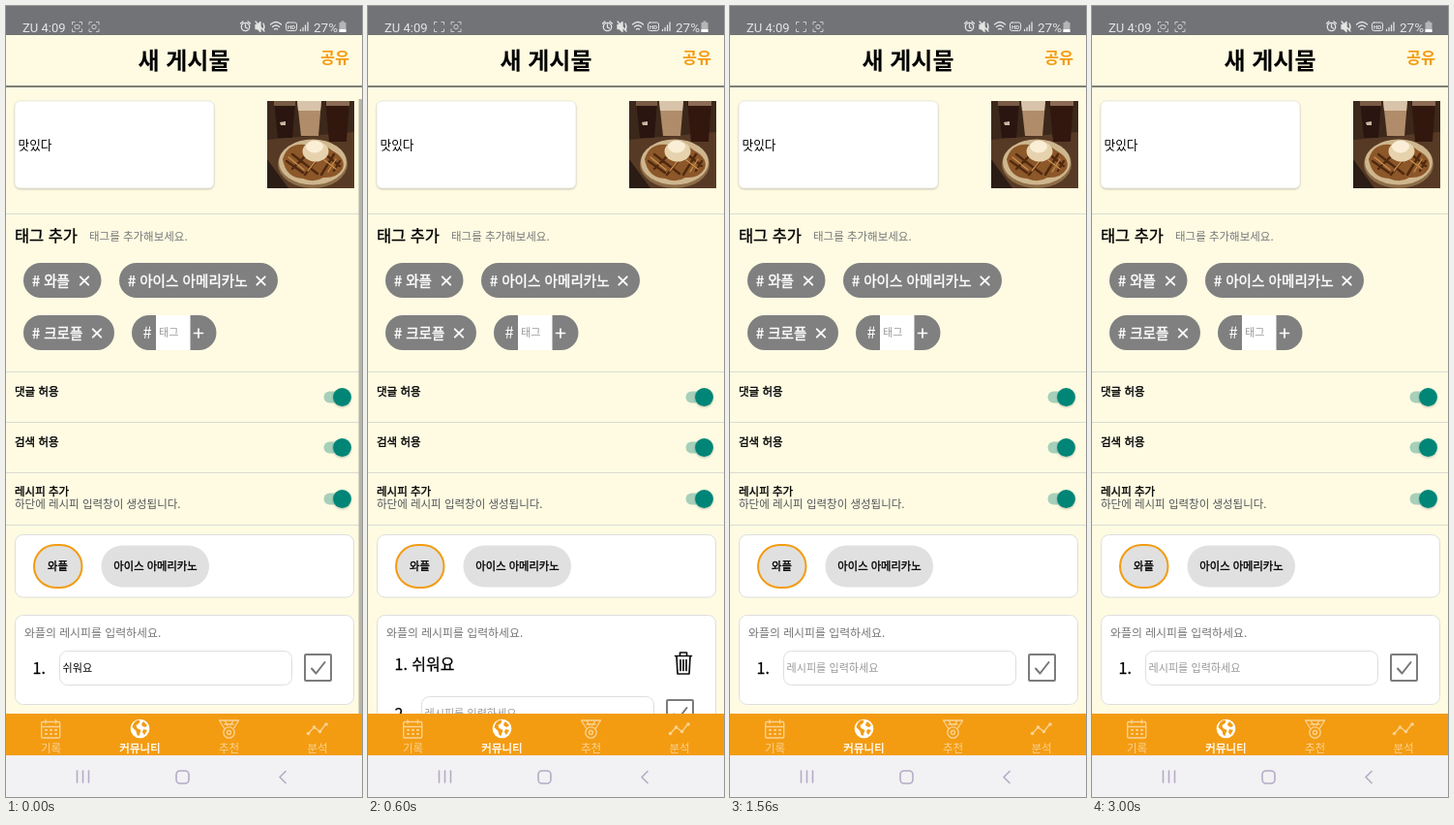
These frames come from a looping animation (368 by 816 pixels, 3120 ms). An HTML page:

```html
<!DOCTYPE html>
<html lang="ko">
<head>
<meta charset="utf-8">
<title>새 게시물</title>
<style>
  html, body { margin: 0; width: 100%; height: 100%; overflow: hidden; background: #fefbe2; }
  svg { display: block; }
  #stage { width: 368px; height: 816px; }
  text { font-family: "Noto Sans CJK KR", "Noto Sans CJK", sans-serif; font-size: 11.5px; fill: #000; }
  .status text { font-family: Roboto, sans-serif; font-size: 13px; fill: #e4e4e4; }
  .medium { stroke: #000; stroke-width: .35; }
  .tag { font-size: 14.6px; fill: #fff; stroke: #fff; stroke-width: .4; }
  .hint { fill: #777; }
  .note { font-weight: 300; fill: #555; }
  .step { font-size: 16px; stroke: #000; stroke-width: .25; }
  .field { font-size: 11.1px; }
  .faint { fill: #999; }
  .middle text, text.middle { text-anchor: middle; }
  .line { fill: none; stroke-linecap: round; stroke-linejoin: round; }
  .card { fill: #fff; stroke: #dedede; }
  .tabs { opacity: .55; }
  .tabs text, .active text { fill: #fff; }
  .active text { stroke: #fff; stroke-width: .35; }

  .dot, .typed, .added, .cleared { animation: 3120ms step-end infinite; }
  .dot { animation-name: blink; }
  .typed { animation-name: typed; }
  .added { animation-name: added; }
  .cleared { animation-name: cleared; }
  .scrollbar { animation: fade 3120ms linear infinite; }
  @keyframes blink {
    0%, 26.923%, 57.692%, 84.615% { opacity: 1; }
    11.538%, 42.308%, 73.077% { opacity: 0; }
  }
  @keyframes typed { 0% { opacity: 1; } 19.231%, 100% { opacity: 0; } }
  @keyframes added { 0%, 50%, 100% { opacity: 0; } 19.231% { opacity: 1; } }
  @keyframes cleared { 0% { opacity: 0; } 50%, 100% { opacity: 1; } }
  @keyframes fade { 0%, 7.692% { opacity: 1; } 19.231%, 100% { opacity: 0; } }
</style>
</head>
<body>
<svg id="stage" viewBox="0 0 368 816">
  <defs>
    <filter id="shadow" x="-20%" y="-20%" width="140%" height="150%">
      <feDropShadow dx="0" dy="1" stdDeviation="1" flood-opacity=".25"/>
    </filter>
    <clipPath id="page"><rect y="84" width="368" height="646"/></clipPath>
    <clipPath id="photo"><rect x="270" y="98" width="90" height="90"/></clipPath>
    <path id="cross" class="line" d="M-4.200-4.200l8.400 8.400m0-8.400l-8.400 8.400" stroke="#fff" stroke-width="1.900"/>
    <path id="corners" class="line" d="M-5-2.500V-5H-2.500M2.500-5H5V-2.500M5 2.500V5H2.500M-2.500 5H-5V2.500" stroke="#ccc" stroke-width="1"/>
    <g id="switch">
      <rect x="-19" y="-6" width="28" height="12" rx="6" fill="#a6d0ba"/>
      <circle r="9.400" fill="#008577" filter="url(#shadow)"/>
    </g>
    <g id="entry">
      <rect class="card" x="55.500" y="665.500" width="240" height="35" rx="8"/>
      <rect x="309" y="669" width="27" height="27" rx="1" fill="#fff" stroke="#7c7c7c" stroke-width="2"/>
      <path class="line" d="M316 683.500l4.500 5 9-11.500" stroke="#777" stroke-width="2"/>
    </g>
  </defs>

  <rect width="368" height="816" fill="#fefbe2"/>

  <g class="status">
    <rect width="368" height="30" fill="#727377"/>
    <text x="17" y="26.500">ZU 4:09</text>
    <use href="#corners" x="73.500" y="21.500"/>
    <rect class="dot" x="71" y="19.500" width="5" height="4" rx="1.500" fill="none" stroke="#ccc"/>
    <use href="#corners" x="91" y="21.500"/>
    <circle cx="91" cy="21.500" r="2.200" fill="none" stroke="#ccc"/>
    <g class="line" stroke="#e4e4e4" stroke-width="1.300">
      <circle cx="247.500" cy="21.500" r="4.200"/>
      <path d="M247.500 19v3l2 1M242.500 18l2.500-2M250 16l2.500 2"/>
      <path d="M258 19.500h2l3-3v10l-3-3h-2zM258 16l9 10M266 18q2 3.500 0 7" fill="#e4e4e4"/>
      <path d="M273.500 19q5.500-5 11 0M275.500 21.500q3.500-3 7 0M277.500 24q1.500-1.300 3 0"/>
      <rect x="289.500" y="17" width="11" height="8.500" rx="2" stroke-width="1"/>
      <path d="M304.500 25.500v-1M307 25.500v-3M309.500 25.500v-5.500M312 25.500v-8.500"/>
    </g>
    <text x="295" y="23.500" class="middle" style="font-size:6px;font-weight:700">HD</text>
    <text x="318" y="26.500" style="font-size:13.500px">27%</text>
    <path d="M346.500 15.500h3v1.500h2v10h-7V17h2z" fill="#b5b5b7"/>
    <path d="M344.500 24h7v3h-7z" fill="#fff"/>
  </g>

  <text x="184" y="64.500" class="middle" style="font-size:24px;font-weight:700">새 게시물</text>
  <text x="325" y="59" style="font-size:16.400px;font-weight:700;fill:#f39c12">공유</text>
  <rect y="82" width="368" height="2" fill="#7f7e75"/>

  <g clip-path="url(#page)">
    <rect x="9" y="98" width="206" height="90" rx="6" fill="#fff" filter="url(#shadow)"/>
    <rect x="9" y="98" width="206" height="90" rx="6" fill="#fff" stroke="#e4e2d8" stroke-width=".700"/>
    <text x="12.500" y="147.500" style="font-size:12.700px">맛있다</text>

    <g clip-path="url(#photo)">
      <rect x="270" y="98" width="90" height="90" fill="#3c281b"/>
      <path d="M270 138l90-8v58h-90z" fill="#573a25"/>
      <path d="M270 158l22 30h-22z" fill="#2b1d15"/>
      <path d="M277 98h22l-3 38h-15z" fill="#2a1510"/>
      <path d="M277 98h22v5h-22z" fill="#795b45"/>
      <path d="M301 98h25l-3 36h-18z" fill="#b08c6a"/>
      <path d="M301 98h25l-1 10h-23z" fill="#d8c4aa"/>
      <path d="M330 98h25l-3 42h-18z" fill="#32170f"/>
      <path d="M331 98h24v5h-24z" fill="#8b6b55"/>
      <path d="M283 120l6-1v4h-5z" fill="#c9b8a2"/>
      <ellipse cx="317" cy="163" rx="36" ry="25" fill="#8d6d48"/>
      <ellipse cx="317" cy="161" rx="35" ry="23.500" fill="#ceb68e"/>
      <path d="M286 158q5-17 23-15 18-3 28 6 15 8 11 19-6 10-20 9-9 6-21 1-18-1-21-20z" fill="#8c5729"/>
      <path class="line" d="M290 160l17 12M296 153l26 20M330 153l15 12M296 168l12-12M309 174l13-16M326 174l13-21M339 170l6-10" stroke="#50290f" stroke-width="2.400"/>
      <path class="line" d="M292 156l16 13M329 159l12 9M312 170l8-10M333 171l8-13" stroke="#c8904f" stroke-width="1.300"/>
      <ellipse cx="320" cy="150" rx="13.500" ry="10.500" fill="#e6d3ae"/>
      <ellipse cx="319" cy="145" rx="9" ry="6.500" fill="#faeed6"/>
    </g>

    <g fill="#dcdbd2">
      <rect y="214" width="368" height="1"/>
      <rect y="377" width="368" height="1"/>
      <rect y="429" width="368" height="1"/>
      <rect y="481" width="368" height="1"/>
      <rect y="535" width="368" height="1"/>
    </g>

    <text x="9" y="243" class="medium" style="font-size:16.400px">태그 추가</text>
    <text x="86" y="241.500" class="hint">태그를 추가해보세요.</text>

    <g fill="#808080">
      <rect x="18" y="265" width="80.500" height="36" rx="18"/>
      <rect x="117" y="265" width="164" height="36" rx="18"/>
      <rect x="18" y="319" width="94" height="36" rx="18"/>
      <rect x="130" y="319" width="87.500" height="36" rx="18"/>
    </g>
    <text x="27" y="288.500" class="tag"># 와플</text>
    <text x="126" y="288.500" class="tag"># 아이스 아메리카노</text>
    <text x="27" y="342.500" class="tag"># 크로플</text>
    <text x="141.500" y="343" class="tag" style="font-size:16.500px;stroke:none">#</text>
    <use href="#cross" x="81" y="283.500"/>
    <use href="#cross" x="263.500" y="283.500"/>
    <use href="#cross" x="94" y="337.500"/>
    <rect x="155" y="319" width="35.500" height="36" fill="#fff"/>
    <text x="158" y="341" class="field faint">태그</text>
    <path class="line" d="M194.500 337.500h9m-4.500-4.500v9" stroke="#fff" stroke-width="1.700"/>

    <text x="9" y="402" class="medium">댓글 허용</text>
    <text x="9" y="454" class="medium">검색 허용</text>
    <text x="9" y="505" class="medium">레시피 추가</text>
    <text x="9" y="518" class="note">하단에 레시피 입력창이 생성됩니다.</text>
    <use href="#switch" x="347.500" y="403.500"/>
    <use href="#switch" x="347.500" y="455.500"/>
    <use href="#switch" x="347.500" y="508.500"/>

    <rect class="card" x="9.500" y="545.500" width="350" height="64.500" rx="8"/>
    <rect x="29" y="556" width="49.500" height="44" rx="22" fill="#e0e0e0" stroke="#f39c12" stroke-width="2"/>
    <rect x="98.500" y="556.500" width="111.500" height="43" rx="21.500" fill="#e0e0e0"/>
    <g class="middle">
      <text x="53.500" y="582" class="medium" style="font-size:11.300px">와플</text>
      <text x="154.500" y="582" class="medium" style="font-size:11.300px">아이스 아메리카노</text>
    </g>

    <rect class="card added" x="9.500" y="628.500" width="350" height="139" rx="8"/>
    <rect class="card typed" x="9.500" y="628.500" width="350" height="92" rx="8"/>
    <rect class="card cleared" x="9.500" y="628.500" width="350" height="92" rx="8"/>
    <text x="19" y="651" class="hint" style="font-size:11.900px">와플의 레시피를 입력하세요.</text>

    <g class="typed">
      <use href="#entry"/>
      <text x="27.500" y="689" class="step">1.</text>
      <text x="58.500" y="687" class="field">쉬워요</text>
    </g>
    <g class="added">
      <text x="27.500" y="684.500" class="step">1. 쉬워요</text>
      <path class="line" d="M317.500 670.500h17M322.500 670v-3h7v3M319 671l1 18h12l1-18M323 674.500v11M326 674.500v11M329 674.500v11" stroke="#111" stroke-width="1.700"/>
      <use href="#entry" y="47"/>
      <text x="27.500" y="736" class="step">2.</text>
      <text x="58.500" y="734" class="field faint">레시피를 입력하세요</text>
    </g>
    <g class="cleared">
      <use href="#entry"/>
      <text x="27.500" y="689" class="step">1.</text>
      <text x="58.500" y="687" class="field faint">레시피를 입력하세요</text>
    </g>

    <rect class="scrollbar" x="364.500" y="96" width="3.500" height="634" fill="#b8b6a8"/>
  </g>

  <rect y="730" width="368" height="43" fill="#f39c12"/>
  <g class="tabs middle">
    <g class="line" stroke="#fff" stroke-width="1.300">
      <rect x="36.700" y="738.500" width="19" height="16.500" rx="1"/>
      <path d="M36.700 743.500h19M41 736.500v3.500M51.500 736.500v3.500"/>
      <path d="M41 747h11M41 751h11" stroke-width="2" stroke-dasharray="1 4"/>
      <path d="M220.500 737h20l-5 8M220.500 737l5 8M226 737l3 5M235 737l-3 5M226 741h9"/>
      <circle cx="230.500" cy="749.500" r="5.700"/>
      <circle cx="230.500" cy="749.500" r="2"/>
      <path d="M313 750l5.500-6 6 4.500 6-7.500"/>
    </g>
    <g fill="#fff">
      <circle cx="312.500" cy="750.500" r="1.800"/>
      <circle cx="318.500" cy="744" r="1.800"/>
      <circle cx="324.500" cy="748.500" r="1.800"/>
      <circle cx="331" cy="741" r="1.800"/>
    </g>
    <text x="46.500" y="770">기록</text>
    <text x="230.500" y="770">추천</text>
    <text x="322" y="770">분석</text>
  </g>
  <g class="active middle">
    <circle cx="138.500" cy="745.500" r="9.800" fill="#fff"/>
    <path d="M131.500 741q3-5 7-4l-1 3-3 2 1 3 4 2-2 6-2-1-1-4-4-4zM142 738l4 4-2 2-3-1-1-2zM142 746l4 1-3 5-2-3z" fill="#f39c12"/>
    <text x="138.500" y="770">커뮤니티</text>
  </g>

  <rect y="773" width="368" height="43" fill="#f2f1f3"/>
  <g class="line" stroke="#b4abc6" stroke-width="1.600">
    <path d="M73.500 789v12M79.500 789v12M85.500 789v12"/>
    <rect x="176" y="789" width="13" height="13" rx="4"/>
    <path d="M289 789.500l-6 6 6 6"/>
  </g>
</svg>
</body>
</html>
```
